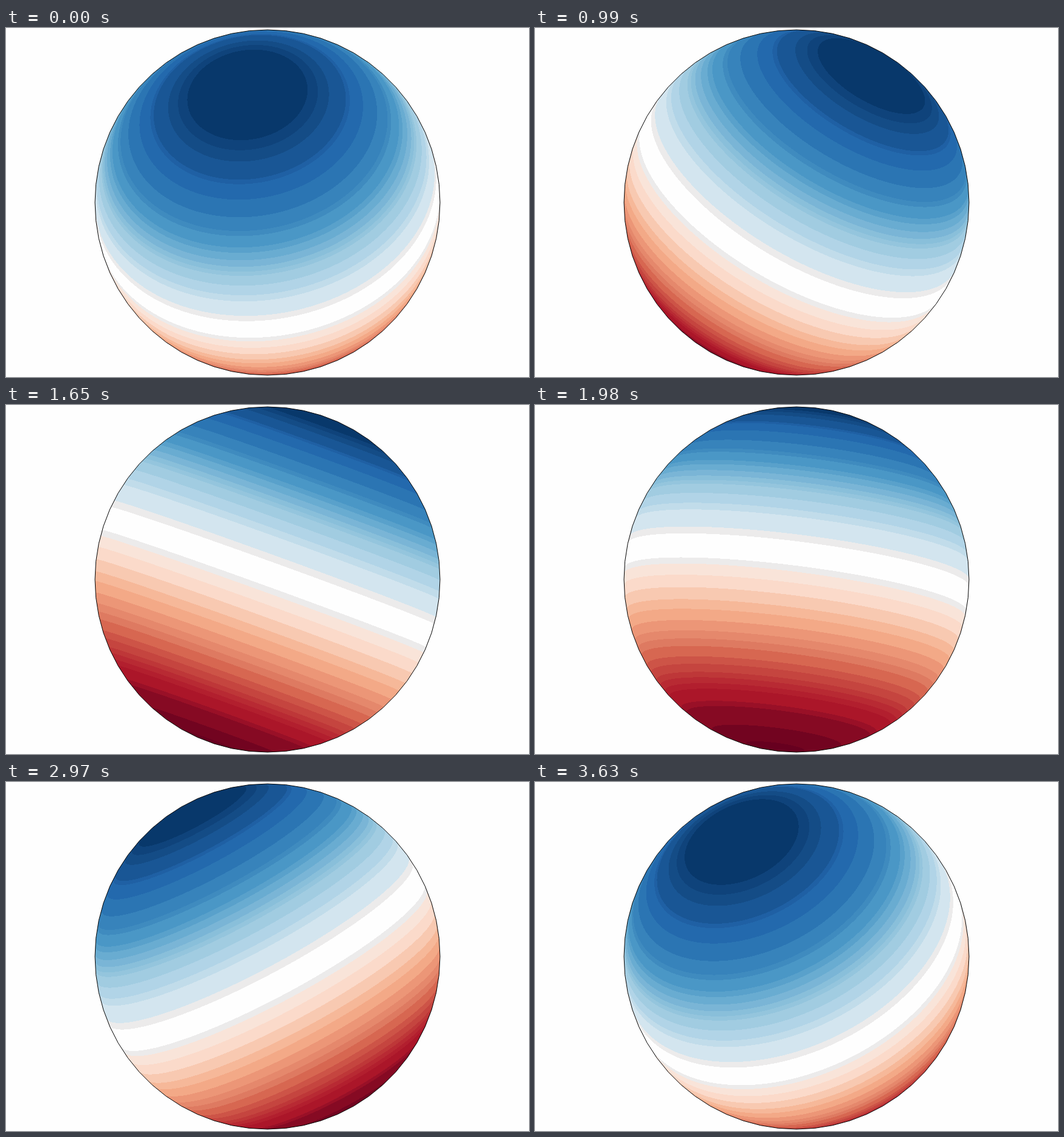
Animation, 864 px wide and 576 px high, one loop 3.96 s. Source, as an HTML page with a canvas:

```html
<!DOCTYPE html>
<html lang="en">
<head>
<meta charset="utf-8">
<title>Rotating tilted dipole</title>
<style>
  html, body { margin: 0; overflow: hidden; background: #fefefe; }
  canvas { display: block; }
</style>
</head>
<body>
<canvas width="864" height="576"></canvas>
<script>
const WIDTH = 864, HEIGHT = 576, CX = 432, CY = 288, RADIUS = 285;
const STEP_MS = 330, STEPS = 12;
const TILT = 28.7 * Math.PI / 180, VIEW_LAT = 20 * Math.PI / 180;

// Lower limit of each band, as the cosine of the angle from the blue pole.
const bands = [
  [.936, '#08386b'], [.913, '#0f437b'], [.883, '#144c86'], [.828, '#195695'],
  [.813, '#1f60a4'], [.757, '#2369ad'], [.687, '#2b75b3'], [.626, '#3783bb'],
  [.603, '#3f8bbf'], [.547, '#4a97c6'], [.520, '#59a1cb'], [.481, '#69acd1'],
  [.445, '#7ab5d6'], [.417, '#89bfda'], [.393, '#94c5dd'], [.334, '#a1cce1'],
  [.272, '#b1d4e7'], [.231, '#c1dcea'], [.126, '#d3e5ef'], [.085, '#ecebeb'],
  [-.057, '#fefefe'], [-.092, '#ecebeb'], [-.157, '#f9e4d9'], [-.227, '#fbdaca'],
  [-.295, '#f8c9b1'], [-.348, '#f6b899'], [-.410, '#f3a987'], [-.465, '#ec9677'],
  [-.508, '#e5886c'], [-.548, '#de7a61'], [-.602, '#d76751'], [-.640, '#cd5447'],
  [-.681, '#c5453f'], [-.708, '#be3738'], [-.737, '#b82a33'], [-.764, '#b21f2e'],
  [-.822, '#ab1629'], [-.845, '#991027'], [-.926, '#860a23'], [-.985, '#720420'],
  [-1, '#67001f']
];

const LOOKUP_HALF = 2000;
const lookup = Uint32Array.from({ length: 2 * LOOKUP_HALF + 1 }, (_, i) => {
  const value = i / LOOKUP_HALF - 1;
  const [, hex] = bands.find(([limit]) => value >= limit) || bands[bands.length - 1];
  const rgb = parseInt(hex.slice(1), 16);
  return (0xff000000 | (rgb & 255) << 16 | (rgb & 0xff00) | rgb >> 16) >>> 0;
});

const ctx = document.querySelector('canvas').getContext('2d');
const image = ctx.createImageData(WIDTH, HEIGHT);
const pixels = new Uint32Array(image.data.buffer);

const outline = new Path2D();
for (let i = 0; i < 60; i++) {
  const angle = i * Math.PI / 30;
  outline.lineTo(CX + RADIUS * Math.cos(angle), CY + RADIUS * Math.sin(angle));
}
outline.closePath();

function poleDirection(longitude) {
  const up = Math.cos(TILT), side = Math.sin(TILT), front = side * Math.cos(longitude);
  return [
    side * Math.sin(longitude),
    up * Math.cos(VIEW_LAT) - front * Math.sin(VIEW_LAT),
    up * Math.sin(VIEW_LAT) + front * Math.cos(VIEW_LAT)
  ];
}

function draw(step) {
  const [px, py, pz] = poleDirection((step * 30 - 15) * Math.PI / 180);
  for (let row = 0; row < HEIGHT; row++) {
    const y = (CY - row - .5) / RADIUS;
    for (let col = CX - RADIUS - 1; col <= CX + RADIUS; col++) {
      const x = (col + .5 - CX) / RADIUS;
      const z = Math.sqrt(Math.max(0, 1 - x * x - y * y));
      const value = Math.max(-1, Math.min(1, px * x + py * y + pz * z));
      pixels[row * WIDTH + col] = lookup[Math.round((value + 1) * LOOKUP_HALF)];
    }
  }
  ctx.putImageData(image, 0, 0);
  ctx.globalCompositeOperation = 'destination-in';
  ctx.fill(outline);
  ctx.globalCompositeOperation = 'source-over';
  ctx.stroke(outline);
}

let shown = -1;
function tick() {
  const step = Math.floor(performance.now() / STEP_MS) % STEPS;
  if (step !== shown) draw(shown = step);
  requestAnimationFrame(tick);
}
tick();
</script>
</body>
</html>
```
